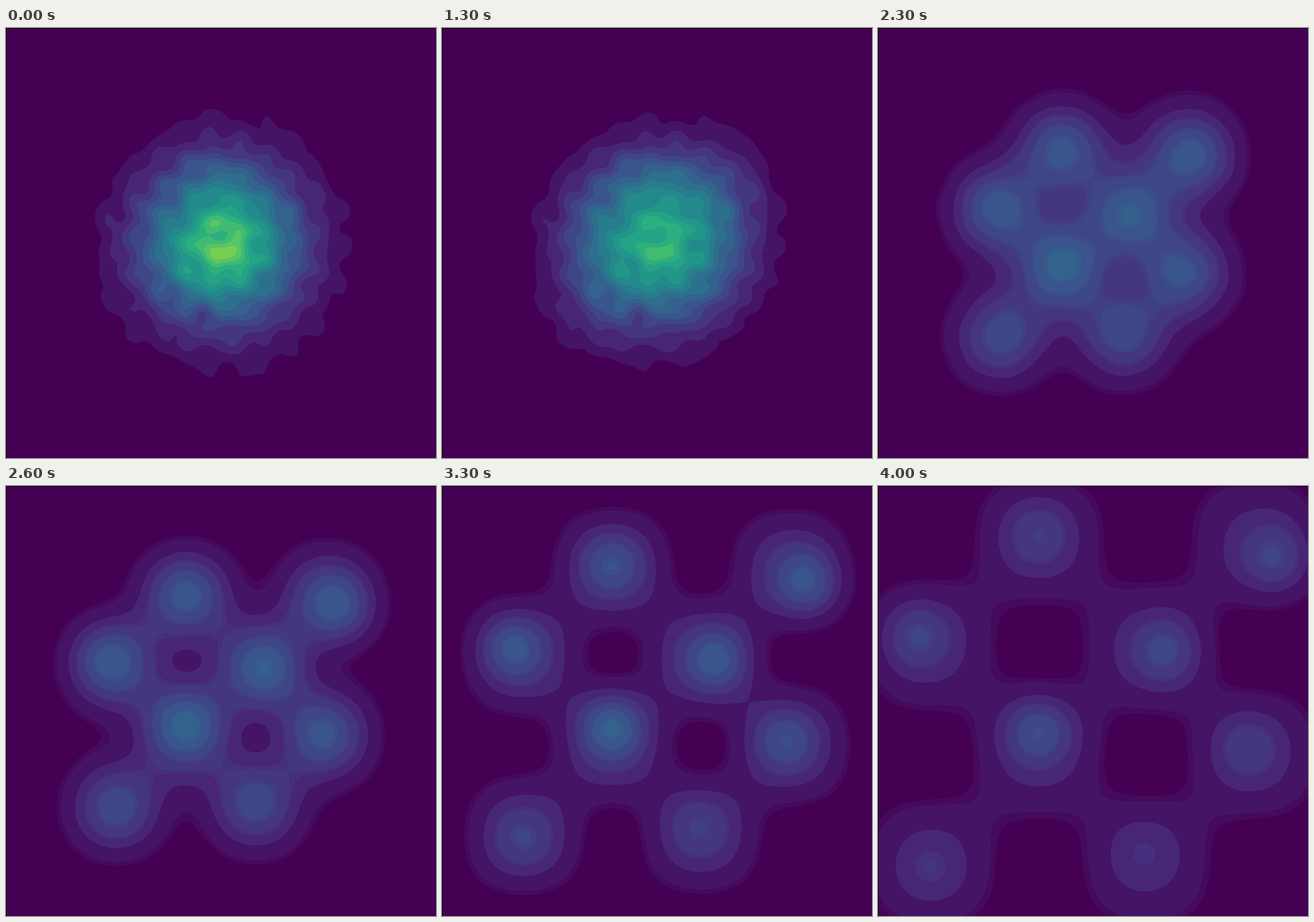
Animation of 748 by 748 pixels, one loop 4100 ms. Source, as an HTML page with a canvas:

```html
<!DOCTYPE html>
<html lang="en">
<head>
<meta charset="utf-8">
<title>Density flow</title>
<style>
  html, body { margin: 0; width: 100%; height: 100%; overflow: hidden; background: #440154; }
  canvas { display: block; }
</style>
</head>
<body>
<canvas id="stage" width="748" height="748"></canvas>
<script>
const SIZE = 748, MID = SIZE / 2, UNIT = SIZE / 8, SQUARE = SIZE / 4;
const GRID = 8, NODES = Math.ceil(SIZE / GRID) + 1;
const STEP_MS = 100, STEPS = 41, FINE = 20, MAX_LEVEL = 19;
const BODY = 2.2, SOFT = 44;

// Densest spot of each checkerboard square at the end: x, y, extra contour levels
const cores = [
  [278, 85, 1.8], [690, 125, 2.3], [68, 260, 2.2], [500, 287, 2.4],
  [278, 425, 3], [642, 455, 1.7], [90, 665, 1], [460, 632, .9]
];

// Main ripples of the early cloud; seeded waves add the rest
const crests = [[385, 395], [335, 235], [390, 255], [344, 150], [430, 605]];
const dips = [[305, 325], [345, 495]];

let seed = 7;
const random = () => (seed = seed * 16807 % 2147483647) / 2147483647;
const waves = Array.from({ length: 10 }, () => {
  const angle = random() * Math.PI, k = .07 + .07 * random();
  return [k * Math.cos(angle), k * Math.sin(angle), random() * 2 * Math.PI];
});

const bump = (x, y, [px, py], variance) =>
  Math.exp(-((x - px) ** 2 + (y - py) ** 2) / (2 * variance));

function ripple(x, y) {
  let n = 0;
  for (const [kx, ky, phase] of waves) n += .25 * Math.cos(kx * x + ky * y + phase);
  for (const p of crests) n += 1.3 * bump(x, y, p, 340);
  for (const p of dips) n -= 1.3 * bump(x, y, p, 340);
  return n;
}

const viridis = ['440154', '472d7b', '3b528b', '2c728e', '21918c', '28ae80', '5ec962', 'addc30', 'fde725']
  .map(hex => [0, 2, 4].map(i => parseInt(hex.slice(i, i + 2), 16)));

function levelColor(level) {
  const at = Math.min(level / MAX_LEVEL, .999) * (viridis.length - 1), i = Math.floor(at);
  const [r, g, b] = viridis[i].map((c, j) => Math.round(c + (viridis[i + 1][j] - c) * (at - i)));
  return (255 << 24 | b << 16 | g << 8 | r) >>> 0;
}

// The spread-out cloud has a thin extra band below most contours
function makePalette(thinBands) {
  return Uint32Array.from({ length: MAX_LEVEL * FINE + 1 }, (_, i) => {
    const level = Math.floor(i / FINE), thin = thinBands && level !== 1 && i % FINE >= FINE * .8;
    return levelColor(level + (thin ? .5 : 0));
  });
}
const early = makePalette(false), late = makePalette(true);

// Smooth step from -1 to 1, close to the error function of z / sqrt(2)
const softStep = z => Math.tanh(.798 * (z + .0447 * z ** 3));

// Blurred profile of each of the four checkerboard stripes, scaled about the middle
function stripes(t, sigma) {
  const scale = Math.max(t, .01);
  return Array.from({ length: 4 }, (_, k) => Array.from({ length: NODES }, (_, i) => {
    const d = i * GRID - MID, start = (k - 2) * SQUARE * scale;
    return (softStep((d - start) / sigma) - softStep((d - start - SQUARE * scale) / sigma)) / (2 * scale);
  }));
}

const field = new Float32Array(NODES * NODES);

// Gaussian noise shrinks while the checkerboard grows out of the middle
function fillField(t) {
  const noise = (1 - t) ** 2, spread = Math.sqrt(noise + t * t * 16 / 3);
  const variance = UNIT * UNIT * noise + SOFT * SOFT * (noise * 3 / 16 + t * t);
  const rough = .35 * Math.min(1, Math.max(0, 2 - t / .3));
  const scaled = v => MID + (v - MID) * t, unscaled = v => MID + (v - MID) / spread;
  const moving = cores.map(([x, y, h]) => [scaled(x), scaled(y), h * SOFT * SOFT / variance]);
  const bands = stripes(t, Math.sqrt(variance));
  for (let j = 0, n = 0; j < NODES; j++) {
    const odd = bands[0][j] + bands[2][j], even = bands[1][j] + bands[3][j];
    for (let i = 0; i < NODES; i++, n++) {
      const x = i * GRID, y = j * GRID;
      let v = BODY * (odd * (bands[1][i] + bands[3][i]) + even * (bands[0][i] + bands[2][i]));
      for (const c of moving) v += c[2] * bump(x, y, c, variance);
      if (rough) v += rough * Math.sqrt(Math.max(0, v)) * ripple(unscaled(x), unscaled(y));
      field[n] = Math.max(0, v);
    }
  }
}

const ctx = document.getElementById('stage').getContext('2d');
const image = ctx.createImageData(SIZE, SIZE);
const pixels = new Uint32Array(image.data.buffer);

function draw(t) {
  fillField(t);
  const palette = t > .5 ? late : early, top = palette.length - 1;
  for (let y = 0, p = 0; y < SIZE; y++) {
    const row = Math.floor(y / GRID) * NODES, fy = y % GRID / GRID;
    for (let x = 0; x < SIZE; x++, p++) {
      const n = row + Math.floor(x / GRID), fx = x % GRID / GRID;
      const a = field[n] + (field[n + 1] - field[n]) * fx;
      const b = field[n + NODES] + (field[n + NODES + 1] - field[n + NODES]) * fx;
      pixels[p] = palette[Math.min(top, Math.floor((a + (b - a) * fy) * FINE))];
    }
  }
  ctx.putImageData(image, 0, 0);
  ctx.fillStyle = '#000';
  ctx.fillRect(0, 0, SIZE, 1);
  ctx.fillRect(0, 0, 1, SIZE);
}

let shown = -1;
function tick() {
  const step = Math.floor(performance.now() / STEP_MS) % STEPS;
  if (step !== shown) draw((shown = step) / (STEPS - 1));
  requestAnimationFrame(tick);
}
tick();
</script>
</body>
</html>
```
